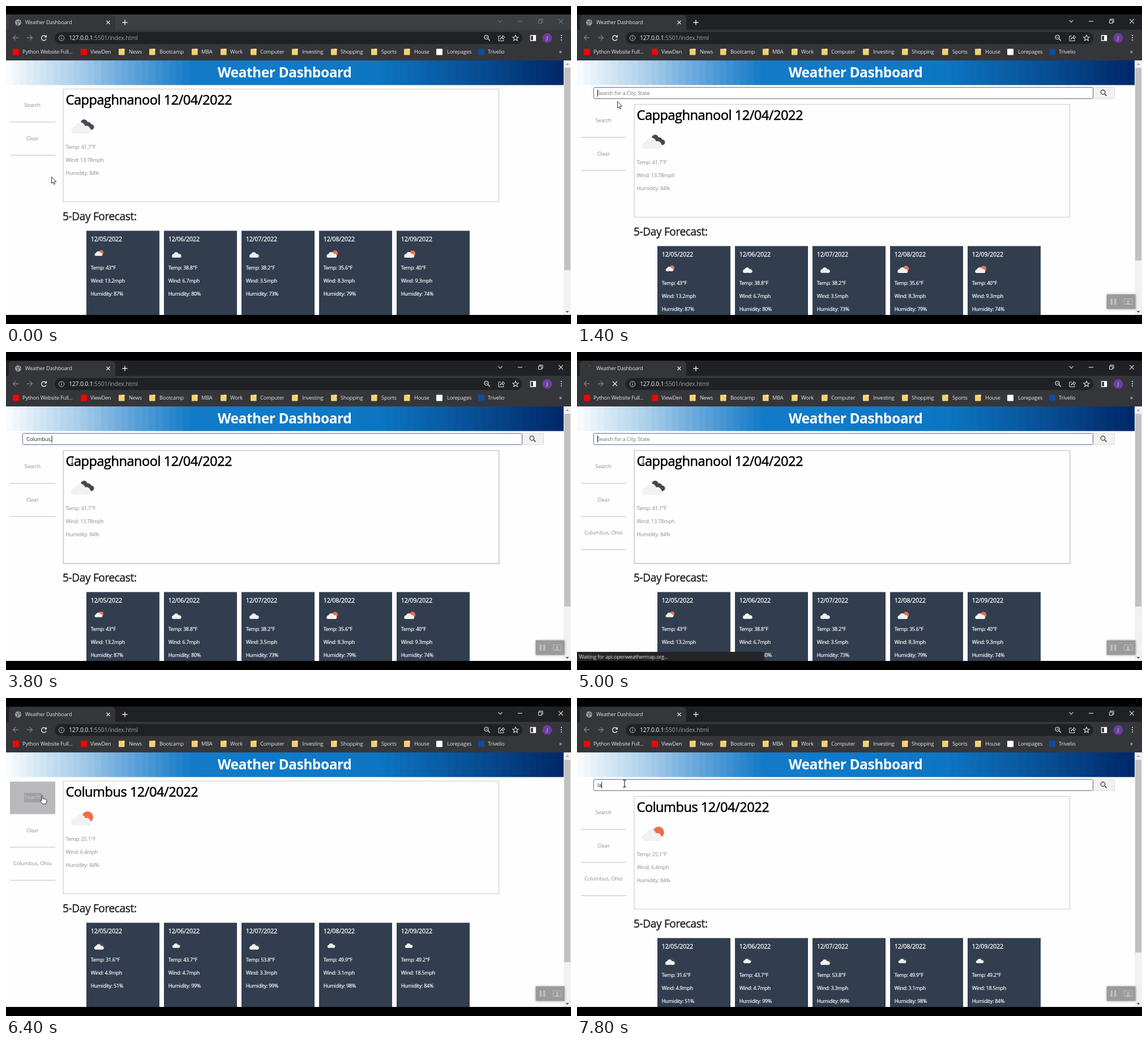
These frames come from a looping animation (998 by 561 pixels, 8 s). An HTML page with a canvas:

```html
<!DOCTYPE html>
<html lang="en">
<head>
<meta charset="utf-8">
<title>Weather Dashboard</title>
<style>
html, body { margin: 0; width: 100%; height: 100%; overflow: hidden; background: #000; }
canvas { display: block; width: 998px; height: 561px; }
</style>
</head>
<body>
<canvas id="stage" width="998" height="561"></canvas>
<script>
const ctx = document.getElementById('stage').getContext('2d');
const LOOP = 8000;
const FONT = '"Open Sans", "Noto Sans", sans-serif';

// Value of the last [time, value] step reached
const at = (steps, t) => steps.reduce((v, s) => t >= s[0] ? s[1] : v, steps[0][1]);
const during = (t, ...spans) => spans.some(([a, b]) => t >= a && t < b);

const TYPED = [[0, ''], [2400, 'C'], [2600, 'Co'], [2800, 'Colu'], [3200, 'Colum'],
  [3400, 'Columb'], [3600, 'Columbu'], [3800, 'Columbus,'], [4200, 'Columbus, O'],
  [4400, 'Columbus, Ohi'], [4600, 'Columbus, Ohio'], [4800, ''], [7400, 'l'], [7600, 'la']];

const POINTER = [[0, ['arrow', 80, 301]], [200, ['arrow', 74, 243]], [400, ['hand', 61, 179]],
  [600, ['hand', 57, 171]], [1000, ['hand', 58, 170]], [1400, ['arrow', 71, 168]],
  [1600, ['arrow', 92, 177]], [1800, ['beam', 117, 191]], [5800, ['beam', 108, 188]],
  [6000, ['hand', 68, 176]], [6200, ['hand', 64, 172]], [6600, ['arrow', 64, 171]],
  [6800, ['beam', 84, 151]]];

const CITIES = [
  { name: 'Cappaghnanool', now: ['41.7', '13.78', 84], icon: 'dark', days: [
    ['43', '13.2', 87, 'sun', .4], ['38.8', '6.7', 80, 'cloud', .48], ['38.2', '3.5', 73, 'cloud', .48],
    ['35.6', '8.3', 79, 'sun', .51], ['40', '9.3', 74, 'sun', .51]] },
  { name: 'Columbus', now: ['25.1', '6.4', 84], icon: 'sun', days: [
    ['31.6', '4.9', 51, 'dark', .48], ['43.7', '4.7', 99, 'dark', .39], ['53.8', '3.3', 99, 'dark', .48],
    ['49.9', '3.1', 98, 'dark', .39], ['49.2', '18.5', 84, 'dark', .39]] }
];

const BOOKMARKS = [[12, 29, 'Python Website Full...', '#f00'], [132, 149, 'ViewDen', '#f00'],
  [199, 217, 'News'], [253, 271, 'Bootcamp'], [328, 345, 'MBA'], [379, 396, 'Work'],
  [432, 449, 'Computer'], [505, 523, 'Investing'], [574, 591, 'Shopping'], [645, 663, 'Sports'],
  [703, 721, 'House'], [760, 779, 'Lorepages', '#fff'], [834, 851, 'Trivelio', '#0f4c9c']];

// Banner colour stops: x, then red, green, blue
const STOPS = [[0, 252, 253, 254], [62, 208, 229, 244], [125, 170, 206, 234], [208, 106, 169, 220],
  [326, 20, 122, 199], [480, 15, 122, 200], [650, 13, 118, 195], [770, 9, 92, 163],
  [870, 6, 68, 137], [940, 2, 49, 115], [985, 0, 40, 104]];

function box(x, y, w, h, color, r = 0) {
  ctx.fillStyle = color;
  ctx.beginPath();
  ctx.roundRect(x, y, w, h, r);
  ctx.fill();
}

function frame(x, y, w, h, color, lw = 1, r = 0) {
  ctx.strokeStyle = color;
  ctx.lineWidth = lw;
  ctx.beginPath();
  ctx.roundRect(x, y, w, h, r);
  ctx.stroke();
}

function dot(x, y, r, color) {
  ctx.fillStyle = color;
  ctx.beginPath();
  ctx.arc(x, y, r, 0, 7);
  ctx.fill();
}

function ring(x, y, r, color, lw = 1, from = 0, to = 2 * Math.PI) {
  ctx.strokeStyle = color;
  ctx.lineWidth = lw;
  ctx.beginPath();
  ctx.arc(x, y, r, from, to);
  ctx.stroke();
}

// SVG path data, drawn relative to (x, y)
function path(x, y, d, stroke, lw = 1.2, fill) {
  ctx.save();
  ctx.translate(x, y);
  const p = new Path2D(d);
  if (fill) { ctx.fillStyle = fill; ctx.fill(p); }
  if (stroke) { ctx.strokeStyle = stroke; ctx.lineWidth = lw; ctx.stroke(p); }
  ctx.restore();
}

// Returns the x where the text ends
function text(s, x, y, size, color, weight = 400, align = 'left') {
  ctx.font = `${weight} ${size}px ${FONT}`;
  ctx.letterSpacing = `${-size * .02}px`;
  ctx.textAlign = align;
  ctx.fillStyle = color;
  ctx.fillText(s, x, y);
  // The font has no medium cut, so a hairline outline thickens the regular one
  if (weight === 500) {
    ctx.strokeStyle = color;
    ctx.lineWidth = size * .024;
    ctx.lineJoin = 'round';
    ctx.strokeText(s, x, y);
    ctx.lineJoin = 'miter';
  }
  return x + ctx.measureText(s).width;
}

function cross(x, y, r, color, lw = 1.2) {
  path(x, y, `M${-r} ${-r}L${r} ${r}M${r} ${-r}L${-r} ${r}`, color, lw);
}

function lens(x, y, r, color) {
  ring(x - 1, y - 1, r, color, 1.2);
  path(x, y, `M${r * .6} ${r * .6}L${r + 1.7} ${r + 1.7}`, color, 1.4);
}

function drawTabs(active, loading) {
  box(0, 15, 998, 28, active ? '#202124' : '#3c4043');
  box(5, 16, 188, 32, '#35363a', 6);
  if (loading) {
    dot(22, 24, .7, '#8ab4f8');
  } else {
    dot(21.5, 29, 5.5, '#9aa0a6');
    path(21.5, 29, 'M-4 -2L-1 -1L0 2L-2 4M1 -4L2 -1L5 0', '#45484c', 1.3);
  }
  text('Weather Dashboard', 34, 32.3, 9.15, '#e2e4e7');
  cross(180.5, 29, 3, '#e8eaed');
  path(210, 29, 'M-4.5 0H4.5M0 -4.5V4.5', '#e8eaed', 1.4);
  const c = active ? '#e8eaed' : '#777b80';
  path(873, 27, 'M-3.5 -2L0 1.8L3.5 -2', c, 1.1);
  path(908, 27, 'M-4 0H4', c, 1.1);
  frame(940.5, 25, 5.5, 5.5, c);
  path(944, 27, 'M-2 -2V-4H4V2H2', c, 1);
  cross(980, 27, 3.8, c, 1.1);
}

function drawToolbar(loading) {
  const c = '#dfe1e5';
  box(0, 42, 998, 54, '#35363a');
  path(17, 56, 'M5 0H-4.5M0 -4.5L-4.5 0L0 4.5', '#7b7f84', 1.3);
  path(42, 56, 'M-5 0H4.5M0 -4.5L4.5 0L0 4.5', '#7b7f84', 1.3);
  if (loading) cross(67, 56, 4, c, 1.5);
  else {
    ring(67, 56.5, 4.3, c, 1.5, .4, 5.5);
    path(67, 56, 'M5 -5V-.5H.7Z', null, 1, c);
  }
  box(86, 46, 826, 21, '#202124', 10.5);
  ring(98, 56.5, 4.7, '#c4c7cb');
  box(97.5, 56, 1.1, 3, '#c4c7cb');
  box(97.5, 53.7, 1.1, 1.2, '#c4c7cb');
  const x = text('127.0.0.1', 111, 60, 10.5, '#f1f3f4');
  text(':5501/index.html', x, 60, 10.5, '#9aa0a6');
  lens(849.5, 56, 3.5, c);
  path(849, 55, 'M-1.7 0H1.7', c, 1);
  path(875, 57, 'M-1 -4H-5V4.5H4V2M-2 2C-2 -1 0 -2.5 2.5 -2.5V-5L6 -1.8L2.5 1.2V-1C0 -1 -1 0 -2 2Z', c, 1);
  path(900, 56.5, 'M0 -5.2L1.5 -1.7L5.2 -1.5L2.3 .9L3.3 4.6L0 2.5L-3.3 4.6L-2.3 .9L-5.2 -1.5L-1.5 -1.7Z', c, 1.1);
  frame(926.5, 52, 9, 9, '#fff', 1.3);
  box(931, 52, 4.5, 9, '#fff');
  dot(956, 56.5, 8.5, '#6b3fa0');
  text('J', 956, 60, 9.5, '#e6dcf2', 400, 'center');
  for (const y of [52, 56, 60]) dot(981, y, 1.1, c);

  for (const [ix, tx, label, color] of BOOKMARKS) {
    if (color) box(ix, 75.5, 11, 11, color, 1);
    else {
      box(ix, 75.5, 10.5, 11, '#f3d16f', 1);
      box(ix + 6, 75.5, 4.5, 3, '#fbe7a6', 1);
    }
    text(label, tx, 84.3, 9.3, '#e4e6e9');
  }
  text('»', 977, 84, 10, '#e8eaed');
}

function cloud(color) {
  box(-20, 1, 35, 11, color, 5.5);
  dot(-4, 1, 9, color);
  dot(-12, 5, 6.5, color);
  dot(7, 5, 6.8, color);
}

function icon(x, y, kind, scale, color) {
  ctx.save();
  ctx.translate(x, y);
  ctx.scale(scale, scale);
  if (kind === 'sun') dot(9, -3, 10, '#ec6e4c');
  if (kind === 'dark') {
    dot(3, -7, 6, '#484650');
    dot(10, -3, 5.5, '#484650');
    dot(15.5, .5, 5, '#484650');
  }
  cloud(color);
  ctx.restore();
}

function readings([temp, wind, hum], x, y, size, color, weight) {
  [`Temp: ${temp}°F`, `Wind: ${wind}mph`, `Humidity: ${hum}%`]
    .forEach((s, i) => text(s, x, y + i * 23.4, size, color, weight));
}

function bannerColor(x) {
  const i = Math.max(1, STOPS.findIndex(s => s[0] >= x));
  const a = STOPS[i - 1], b = STOPS[i];
  const k = (x - a[0]) / (b[0] - a[0]);
  const [r, g, bl] = [1, 2, 3].map(n => a[n] + (b[n] - a[n]) * k);
  return `rgb(${r}, ${g}, ${bl})`;
}

function drawBanner() {
  const step = 12;
  for (let x = 0; x < 985; x += step) {
    box(x, 96, Math.min(step, 985 - x), 43.5, bannerColor(Math.min(x + step / 2, 985)));
  }
  text('Weather Dashboard', 492, 126, 24.6, '#fff', 700, 'center');
}

function drawSearch(typed) {
  box(912, 143, 38, 21, '#f1f1f2', 2);
  frame(912, 143.5, 37.5, 20, '#dcdcdc', 1, 2);
  lens(930, 153, 3.8, '#222');
  box(29, 143, 883, 21, '#fff', 2);
  frame(29.5, 143.5, 882, 20, '#5a6a9a', 1, 2);
  let x = 36;
  if (typed) x = text(typed, 36, 157, 9.3, '#222');
  else text('Search for a City, State', 36, 157, 9.3, '#747474');
  box(x, 147.5, 1, 12, '#111');
}

function drawSidebar(t, loaded) {
  const hover = during(t, [400, 1400], [6000, 6600]);
  if (hover) box(7, 147.5, 80, 57.5, '#b9b9bb');
  if (during(t, [6400, 6600])) box(32, 167.5, 31, 16.5, '#a0a0a2');
  const items = ['Search', 'Clear'];
  if (loaded) items.push('Columbus, Ohio');
  items.forEach((s, i) => {
    text(s, 46.7, 178.3 + i * 58.5, 9.4, hover && !i ? '#cfcfd1' : '#909092', 400, 'center');
    box(7, 204 + i * 58.5, 80, 1.3, '#cacaca');
  });
}

function drawContent(t, city) {
  drawSidebar(t, t >= 4800);
  frame(101, 146.5, 769.5, 199, '#cccccc', 1.2);
  if (during(t, [1800, 5400])) frame(101.5, 147, 769.5, 199.5, '#d4d4d4', 1.6);
  text(`${city.name} 12/04/2022`, 105.5, 174.3, 23.55, '#000', 500);
  icon(135, 213, city.icon, 1, '#f2f2f3');
  readings(city.now, 105.5, 251.6, 9.1, '#8a8a8c', 400);
  text('5-Day Forecast:', 100, 377.5, 19.1, '#212529', 500);
  city.days.forEach((d, i) => {
    const x = 142 + i * 137;
    box(x, 396.5, 129, 200, '#323e4f');
    text(`12/0${5 + i}/2022`, x + 7.7, 414.5, 10.8, '#fff', 500);
    const small = d[4] < .45;
    icon(x + (small ? 22.5 : 23.5), small ? 436 : 438, d[3], d[4], '#f2f2f3');
    readings(d, x + 7.7, 464.6, 8.85, '#fff', 500);
  });
}

function drawScrollbar(open) {
  box(985, 96, 13, 449, '#f1f1f1');
  box(986, 109, 11, open ? 340 : 357, '#c1c1c1');
  path(991.5, 102.5, 'M-3 1.5L0 -1.8L3 1.5Z', null, 1, '#a0a0a0');
  path(991.5, 539.5, 'M-3 -1.5L0 1.8L3 -1.5Z', null, 1, '#505050');
}

function drawRecorder() {
  ctx.save();
  ctx.shadowColor = 'rgba(0,0,0,.35)';
  ctx.shadowBlur = 5;
  box(935.5, 508.5, 51, 26, '#9b9b9b');
  ctx.restore();
  const c = '#bebebe';
  box(942.5, 516, 3.5, 11, c);
  box(949, 516, 3.5, 11, c);
  frame(966.5, 516.5, 14, 10, c);
  dot(973.5, 520.5, 2, c);
  path(973.5, 526, 'M-4 0L0 -4L4 0Z', null, 1, c);
}

function drawPointer([kind, x, y]) {
  if (kind === 'arrow') {
    path(x, y, 'M.5 .5V12L3.2 9.5L5 13.8L6.8 13L5 8.9H8.7Z', '#222', .9, '#fff');
  } else if (kind === 'hand') {
    path(x, y, 'M-1 1C-1 -.3 1 -.3 1 1V6L3 5.8L5 6.4L7 7C8 7.3 8 8 8 9L6.8 14.8H.3L-3.5 9.6C-4.2 8.4 -2.8 7.8 -1 9.6Z', '#222', .9, '#fff');
  } else {
    path(x, y, 'M-3 -6H-.8L0 -5.3L.8 -6H3M0 -5.5V5.5M-3 6H-.8L0 5.3L.8 6H3', '#111', 1.1);
  }
}

function draw(t) {
  const open = during(t, [1400, 5400], [6600, LOOP]);
  const loading = during(t, [5000, 5400]);
  box(0, 0, 998, 561, '#000');
  drawTabs(t >= 1400, loading);
  drawToolbar(loading);

  ctx.save();
  ctx.beginPath();
  ctx.rect(0, 96, 998, 449);
  ctx.clip();
  box(0, 96, 998, 449, '#fefefe');
  drawBanner();
  ctx.save();
  if (open) ctx.translate(0, 27);
  drawContent(t, CITIES[t < 5400 ? 0 : 1]);
  ctx.restore();
  if (open) drawSearch(at(TYPED, t));
  drawScrollbar(open);
  if (during(t, [5000, 5600])) {
    box(0, 529, 331, 16, '#242528');
    text('Waiting for api.openweathermap.org...', 3.5, 541, 9.15, '#e8eaed');
  }
  if (t >= 400) drawRecorder();
  drawPointer(at(POINTER, t));
  ctx.restore();
}

const start = performance.now();
function tick() {
  draw((performance.now() - start) % LOOP);
  requestAnimationFrame(tick);
}
tick();
</script>
</body>
</html>
```
